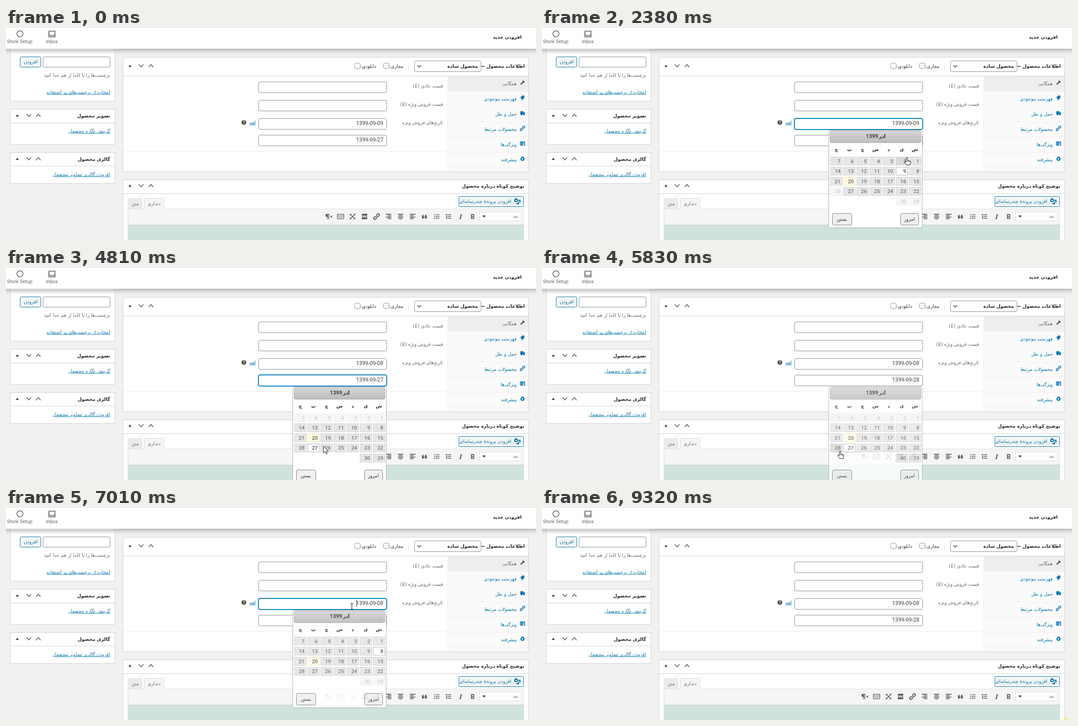
Recreate the animation shown at these times as an HTML page. Size 1180 by 474 pixels, loop 9.39 s.

```html
<!DOCTYPE html>
<html lang="fa">
<head>
<meta charset="utf-8">
<title>افزودن جدید</title>
<style>
html, body { margin: 0; width: 100%; height: 100%; overflow: hidden; background: #f1f1f1; }
svg { display: block; }
text { font: 10.3px "DejaVu Sans", sans-serif; fill: #23282d; }
.soft { fill: #666; }
.link { fill: #0073aa; }
.under { text-decoration: underline; }
.num { font: 12px Roboto, sans-serif; fill: #444; }
.latin { font: 11px Roboto, sans-serif; fill: #666; }
.bold { font-weight: 700; }
.mid { text-anchor: middle; }
.end { text-anchor: end; }
</style>
</head>
<body>
<svg id="stage" width="1180" height="474" viewBox="0 0 1180 474"></svg>
<script>
const stage = document.getElementById('stage');

// Drawing helpers that return SVG markup
const rect = (x, y, w, h, fill = '#fff', stroke = 'none', r = 0, extra = '') =>
  `<rect x="${x}" y="${y}" width="${w}" height="${h}" rx="${r}" fill="${fill}" stroke="${stroke}" ${extra}/>`;
const path = (d, stroke = '#555', width = 1.5, fill = 'none', dash = 'none') =>
  `<path d="${d}" fill="${fill}" stroke="${stroke}" stroke-width="${width}" stroke-dasharray="${dash}"/>`;
const solid = (d, fill = '#555') => path(d, 'none', 0, fill);
const fa = (x, y, s, cls = '') => `<text x="${x}" y="${y}" class="${cls}" direction="rtl">${s}</text>`;
const latin = (x, y, s, cls) => `<text x="${x}" y="${y}" class="${cls}">${s}</text>`;
const at = (x, y, body) => `<g transform="translate(${x} ${y})">${body}</g>`;
const hline = (x1, x2, y, color = '#e2e4e7') => path(`M${x1} ${y}H${x2}`, color, 1);
const field = (x, y, w, h) => rect(x + .5, y + .5, w, h, '#fff', '#7e8993', 3.5);
const button = (x, y, w, h) => rect(x + .5, y + .5, w, h, '#f3f5f6', '#0071a1', 3);

const handles = (xs, y) =>
  at(xs[0], y, solid('M-3.5 2.5L0 -2.5L3.5 2.5Z', '#444')) +
  at(xs[1], y, path('M-5 -3L0 2.5L5 -3', '#555', 1.7)) +
  at(xs[2], y, path('M-5 3L0 -2.5L5 3', '#555', 1.7));

const panel = (x, y, w, h, headY, title, titleX, baseline, xs) =>
  rect(x + .5, y + .5, w, h, '#fff', '#ccd0d4') + hline(x, x + w, headY + .5, '#ccd0d4') +
  fa(titleX, baseline, title, 'bold') + handles(xs, baseline - 4.5);

function header() {
  return `<defs><linearGradient id="shade" x2="0" y2="1">
    <stop stop-opacity=".25"/><stop offset=".4" stop-opacity=".1"/><stop offset="1" stop-opacity="0"/></linearGradient>
    <linearGradient id="bar" x2="0" y2="1"><stop stop-color="#d6d6d6"/><stop offset="1" stop-color="#bdbdbd"/></linearGradient></defs>` +
    rect(0, 46, 1180, 14, 'url(#shade)') + rect(0, 0, 1180, 46.5) +
    '<circle cx="31" cy="13" r="6.8" fill="none" stroke="#555" stroke-width="1.5"/>' +
    path('M95.5 7H109V20H95.5ZM95.5 16H99.5Q102 19 105 16H109', '#555', 1.7) +
    latin(30.5, 34, 'Store Setup', 'latin mid') + latin(102, 34, 'Inbox', 'latin mid') +
    fa(1148, 24, 'افزودن جدید', 'bold');
}

function sidebar() {
  const xs = [25, 51, 72];
  return rect(9.5, 30.5, 233, 133, '#fff', '#ccd0d4') + hline(9, 243, 51.5, '#ccd0d4') +
    field(82, 64, 149, 23) + button(31, 64, 46, 23) + fa(70, 79, 'افزودن', 'link') +
    fa(232, 109, 'برچسب&zwnj;ها را با کاما از هم جدا کنید', 'soft') +
    fa(232, 147, 'انتخاب از برچسب&zwnj;های پر استفاده', 'link under') +
    panel(9, 181, 233, 79, 212, 'تصویر محصول', 232, 200, xs) +
    fa(232, 234, 'گزینش نگاره محصول', 'link under') +
    panel(9, 278, 233, 69, 308, 'گالری محصول', 232, 297, xs) +
    fa(232, 331, 'افزودن گالری تصاویر محصول', 'link under');
}

const chain = color => '<g transform="rotate(-45)">' +
  path('M-1 -2H-4.5A2 2 0 0 0 -4.5 2H-1M1 -2H4.5A2 2 0 0 1 4.5 2H1M-2.5 0H2.5', color) + '</g>';
const tabIcons = [
  solid('M-5 3.5L0 -1.5A3 3 0 0 1 3.5 -5L2 -3L3.5 -1.5L5 -3A3 3 0 0 1 1.5 .5L-3 5Z', '#444'),
  solid('M-5 -1L0 -5H4V-1L-1 4Z', '#0073aa') + path('M-3 3L0 5L5 0', '#0073aa', 1),
  solid('M-5 -4H2V3H-5ZM2.5 -2H4L5.5 0V3H2.5Z', '#0073aa') +
    [-2.5, 3].map(x => `<circle cx="${x}" cy="3.5" r="1.6" fill="#0073aa"/>`).join(''),
  chain('#0073aa'),
  path('M-4.5 -4H4.5V4H-4.5Z', '#0073aa', 1.4) + path('M-4 -2.6H4M-4 0H4M-4 2H1M-1.5 -2V4', '#0073aa', 1.2),
  '<circle r="2.8" fill="none" stroke="#0073aa" stroke-width="2.2"/>' +
    '<circle r="4.3" fill="none" stroke="#0073aa" stroke-width="1.6" stroke-dasharray="1.7 1.68"/>'
];

function productData() {
  const tabs = ['همگانی', 'فهرست موجودی', 'حمل و نقل', 'محصولات مرتبط', 'ویژگی&zwnj;ها', 'پیشرفته'];
  const labels = ['قیمت عادی (£)', 'قیمت فروش ویژه (£)', 'تاریخ&zwnj;های فروش ویژه'];
  const tick = x => rect(x + .5, 78.5, 12, 12, '#fff', '#7e8993', 3);
  return hline(260, 1164, 47.5, '#ccd0d4') +
    panel(260, 65, 903, 256, 107, 'اطلاعات محصول —', 1155, 89, [276, 301, 323]) +
    field(909, 73, 148, 24) + fa(1051, 89, 'محصول ساده', 'bold') + path('M916 83L920 87.5L924.5 83', '#555', 1.7) +
    path('M896.5 78V93', '#ddd', 1) +
    fa(885, 89, 'مجازی:') + tick(840) + fa(824, 89, 'دانلودی:') + tick(776) +
    rect(983, 108, 180, 213, '#fafafa') + rect(983, 108, 180, 33, '#eee') + path('M983.5 108V321', '#eee', 1) +
    tabs.map((name, i) => hline(983, 1163, 141.5 + 34.1 * i, '#eee') +
      fa(1137, 127.5 + 34.1 * i, name, i ? 'link' : 'soft') + at(1150, 122 + 34.1 * i, tabIcons[i])).join('') +
    labels.map((s, i) => fa(973, 133 + 41 * i, s, 'soft')).join('') +
    [120, 161, 202, 239].map(y => field(562, y, 285, 24)).join('') +
    hline(261, 983, 275.5, '#eee') + fa(556, 215, 'لغو', 'link under') +
    '<circle cx="529.5" cy="211" r="5.2" fill="#444"/>' +
    '<text x="529.5" y="214.2" class="mid bold" style="font-size:8.5px;fill:#fff">?</text>';
}

const rows = (...spans) => path(spans.map(([a, b], i) => `M${a} ${-5 + i * 3.3}H${b}`).join(''), '#555', 1.8);
const listIcon = mark => path('M-2 -4H6M-2 0H6M-2 4H6') + mark;

function toolbar() {
  const quote = x => solid(`M${x} 4V-.5Q${x} -4 ${x + 4} -4.5V-3Q${x + 2.3} -2.3 ${x + 2.3} -.5H${x + 4.8}V4Z`);
  const icons = [
    '<text y="5" class="mid" style="font:700 14px Roboto,sans-serif;fill:#555">B</text>',
    '<text y="5" class="mid" style="font:italic 700 15px \'Noto Serif\',serif;fill:#555">I</text>',
    listIcon([-4, 0, 4].map(y => `<circle cx="-4.5" cy="${y}" r="1.4" fill="#555"/>`).join('')),
    listIcon(path('M-4.5 -6V-2.5M-5.5 -1H-4V1H-5.5M-5.5 3H-4V5.5H-5.5', '#555', 1)),
    quote(-6) + quote(.5),
    rows([-6, 6], [-6, 2], [-6, 6], [-6, 2]),
    rows([-6, 6], [-4, 4], [-6, 6], [-4, 4]),
    rows([-6, 6], [-2, 6], [-6, 6], [-2, 6]),
    `<g transform="scale(1.25)">${chain('#555')}</g>`,
    solid('M-6 -6H6V-2H-6ZM-6 2H6V6H-6Z') + path('M-6 0H-3M-1.5 0H1.5M3 0H6', '#555', 1.3),
    path('M-4 -4L4 4M4 -4L-4 4') + solid('M-6 -6H-2L-6 -2ZM6 -6H2L6 -2ZM-6 6H-2L-6 2ZM6 6H2L6 2Z'),
    path('M-7 -5.5H7.5V5.5H-7Z', '#555', 1.2) + path('M-6 -3H7M-6 0H7M-4 3H5', '#555', 1.6, 'none', '1.7 1'),
    solid('M1 -6H-3A3.5 3.5 0 0 0 -3 1V6H-1.5V-4.5H0V6H1.5V-6ZM7.5 -3V3L4 0Z')
  ];
  return icons.map((icon, i) => at(1039 - 26.75 * i, 421.5, icon)).join('');
}

function editor() {
  return panel(260, 339, 903, 150, 370, 'توضیح کوتاه درباره محصول', 1154, 357, [276, 301, 323]) +
    button(1008, 376, 144, 23) + fa(1125, 391, 'افزودن پروندۀ چندرسانه&zwnj;ای', 'link') +
    at(1138, 387, solid('M-6 -5H-4L-3.5 -6.5H-.5L0 -5H1.5V2H-6ZM3 -3H7.5V3.5H6V-.5H4.5V5A2 1.8 0 1 1 3 3.5Z', '#0073aa') +
      '<circle cx="-2.2" cy="-1.6" r="1.7" fill="#f3f5f6"/>' + solid('M-1.5 4H1V7H-1.5Z', '#0073aa')) +
    rect(271.5, 381.5, 31, 24, '#ebebeb', '#dfdfdf') + fa(296, 396, 'متن', 'soft') +
    rect(271.5, 404.5, 881, 36, '#f5f5f5', '#dcdcdc') +
    rect(307.5, 380.5, 44, 25, '#f5f5f5', '#dfdfdf') + rect(308, 404, 43.5, 3, '#f5f5f5') + fa(344, 396, 'دیداری', 'soft') +
    rect(1054.5, 411.5, 93, 20, '#fff', '#ddd') + fa(1140, 424, 'بند', 'soft') + solid('M1061 419H1068L1064.5 424Z', '#444') +
    toolbar() + rect(271, 441, 882, 40, '#cfe2db') + hline(271, 1153, 440.5, '#c3cbc8') +
    path('M271.5 441V474M1152.5 441V474', '#d5dcd9', 1);
}

// Calendar grid runs right to left
const colX = d => 817.5 - 29.2 * ((d - 1) % 7);
const rowY = d => 288.5 + 22.6 * Math.floor((d - 1) / 7);

function dayCell(d, { picked, blocked }) {
  const [fill, stroke, ink] = d === picked ? ['#fff', '#aaa', '#212121']
    : d === 20 ? ['#fdf9e3', '#f5eab8', '#363636'] : ['#e6e6e6', '#d0d0d0', '#555'];
  return `<g opacity="${blocked(d) ? .35 : 1}">` + rect(colX(d), rowY(d), 26, 18, fill, stroke) +
    `<text x="${colX(d) + 22.5}" y="${rowY(d) + 13}" class="num end" style="font-size:11.5px;fill:${ink}">${d}</text></g>`;
}

function calendar(session) {
  const days = Array.from({ length: 30 }, (_, i) => dayCell(i + 1, session)).join('');
  const names = [...'شیدسچپج'].map((s, i) => fa(830 - 29.1 * i, 275, s, 'bold mid')).join('');
  const push = (x, w, s) => rect(x + .5, 414.5, w, 26, '#f0f0f0', '#777', 3) + fa(x + w / 2, 431, s, 'mid');
  return rect(638.5, 228.5, 208, 218, '#fff', '#aaa', 3) + rect(641.5, 230.5, 202, 26, 'url(#bar)', '#aaa', 3) +
    fa(765, 246, 'آذر', 'bold') + latin(721, 246, '1399', 'num bold') +
    names + days + push(798, 40, 'امروز') + push(646, 43, 'بستن');
}

const cursors = {
  arrow: path('M0 0V15.5L3.6 12.2L6 17.8L8.4 16.8L6 11.3H11Z', '#111', 1, '#fff'),
  beam: path('M-3 -6.5H-1L0 -5.5L1 -6.5H3M0 -5.5V5.5M-3 6.5H-1L0 5.5L1 6.5H3', '#111', 1.1),
  hand: path('M-1 0Q.5 -2 2 0V6L8 7.5Q9.5 8 9 11L7.5 16H0L-4.5 10Q-5 8 -3 8L-1 10Z', '#111', 1, '#fff') +
    path('M2 6V9M4.5 7V9.5M7 7.5V10', '#111', .8)
};

// time, x, y, shape
const moves = [
  [360, 1085, 438, 'arrow'], [680, 800, 268, 'arrow'], [740, 775, 248, 'beam'], [890, 775, 248, 'beam'],
  [1300, 752, 216, 'beam'], [2080, 752, 216, 'beam'], [2190, 770, 236, 'arrow'], [2340, 806, 283, 'hand'],
  [2380, 812, 290, 'hand'], [2740, 830, 322, 'hand'], [3120, 830, 322, 'hand'], [3240, 822, 312, 'arrow'],
  [3790, 767, 269, 'arrow'], [3870, 763, 259, 'beam'], [4080, 757, 252, 'beam'],
  [4490, 755, 252, 'beam'], [4560, 745, 285, 'arrow'], [4810, 707, 398, 'arrow'], [4900, 690, 405, 'hand'],
  [5360, 664, 410, 'hand'], [5860, 663, 410, 'hand'], [5940, 680, 380, 'arrow'],
  [6270, 748, 262, 'beam'], [6320, 754, 253, 'beam'], [6470, 770, 223, 'beam'], [6640, 770, 220, 'beam'],
  [7380, 770, 220, 'beam'], [7460, 785, 228, 'arrow'], [7930, 947, 290, 'arrow'], [8300, 947, 290, 'arrow'],
  [8940, 1143, 450, 'arrow']
];
const sessions = [
  { open: 1500, close: 2980, shift: 0, picked: 9, blocked: d => d > 27 },
  { open: 4080, close: 5760, shift: 37, picked: 27, blocked: d => d < 8 },
  { open: 6800, close: 8160, shift: 0, picked: 8, blocked: d => d > 28 }
];
const LOOP = 9390, FADE = 260, BLINK = 530;

stage.innerHTML = rect(0, 0, 1180, 474, '#f1f1f1') + sidebar() + productData() + editor() + header() +
  '<text id="from" x="840" y="217" class="num end"></text><text id="to" x="840" y="254" class="num end"></text>' +
  `<g id="focus">${rect(562, 202, 285.5, 25, 'none', '#007cba', 4, 'stroke-width="2"')}</g>` +
  `<g id="caret">${path('M780.5 206V221', '#111', 1)}</g>` +
  '<g id="popup"><g id="sheet"></g><rect id="hover" width="26" height="18" fill="#000" opacity=".06"/></g>' +
  '<circle id="glow" cx="1166" cy="479" r="9" fill="#f5f06a" opacity=".8"/>' +
  Object.entries(cursors).map(([k, body]) => `<g id="${k}">${body}</g>`).join('');

const el = Object.fromEntries([...stage.querySelectorAll('[id]')].map(e => [e.id, e]));
const show = (e, on) => { e.style.display = on ? '' : 'none'; };
const place = (e, x, y) => e.setAttribute('transform', `translate(${x} ${y})`);
const swing = p => .5 - .5 * Math.cos(Math.PI * Math.max(0, Math.min(1, p)));

function pointer(t) {
  const i = moves.findIndex(m => m[0] > t);
  if (i < 1) return null;
  const [a, b] = [moves[i - 1], moves[i]];
  const p = (t - a[0]) / (b[0] - a[0]);
  return { x: a[1] + (b[1] - a[1]) * p, y: a[2] + (b[2] - a[2]) * p, shape: a[3] };
}

function drawHover(p, session) {
  const col = p ? Math.floor((844 - p.x) / 29.2) : 0;
  const row = p ? Math.floor((p.y - session.shift - 288) / 22.6) : 0;
  const day = row * 7 + col + 1;
  const on = p && p.shape === 'hand' && day > 0 && day < 31 && !session.blocked(day);
  show(el.hover, on);
  if (on) place(el.hover, colX(day), rowY(day));
}

let drawn = null;
function draw(t) {
  el.from.textContent = t < 2980 ? '1399-09-09' : '1399-09-08';
  el.to.textContent = t < 5760 ? '1399-09-27' : '1399-09-28';

  const p = pointer(t);
  for (const k in cursors) show(el[k], p && p.shape === k);
  if (p) place(el[p.shape], p.x, p.y);

  const s = sessions.find(s => t >= s.open && t < s.close + FADE);
  const active = s && t < s.close;
  show(el.popup, s);
  show(el.focus, active);
  show(el.caret, active && Math.floor((t - s.open) / BLINK) % 2 === 0);
  show(el.glow, t >= 9170);
  if (!s) return;
  if (s !== drawn) {
    el.sheet.innerHTML = calendar(s);
    for (const e of [el.popup, el.focus, el.caret]) place(e, 0, s.shift);
    drawn = s;
  }
  el.popup.style.opacity = active ? swing((t - s.open) / FADE) : 1 - swing((t - s.close) / FADE);
  drawHover(p, s);
}

const start = performance.now();
function tick() {
  draw((performance.now() - start) % LOOP);
  requestAnimationFrame(tick);
}
tick();
</script>
</body>
</html>
```
